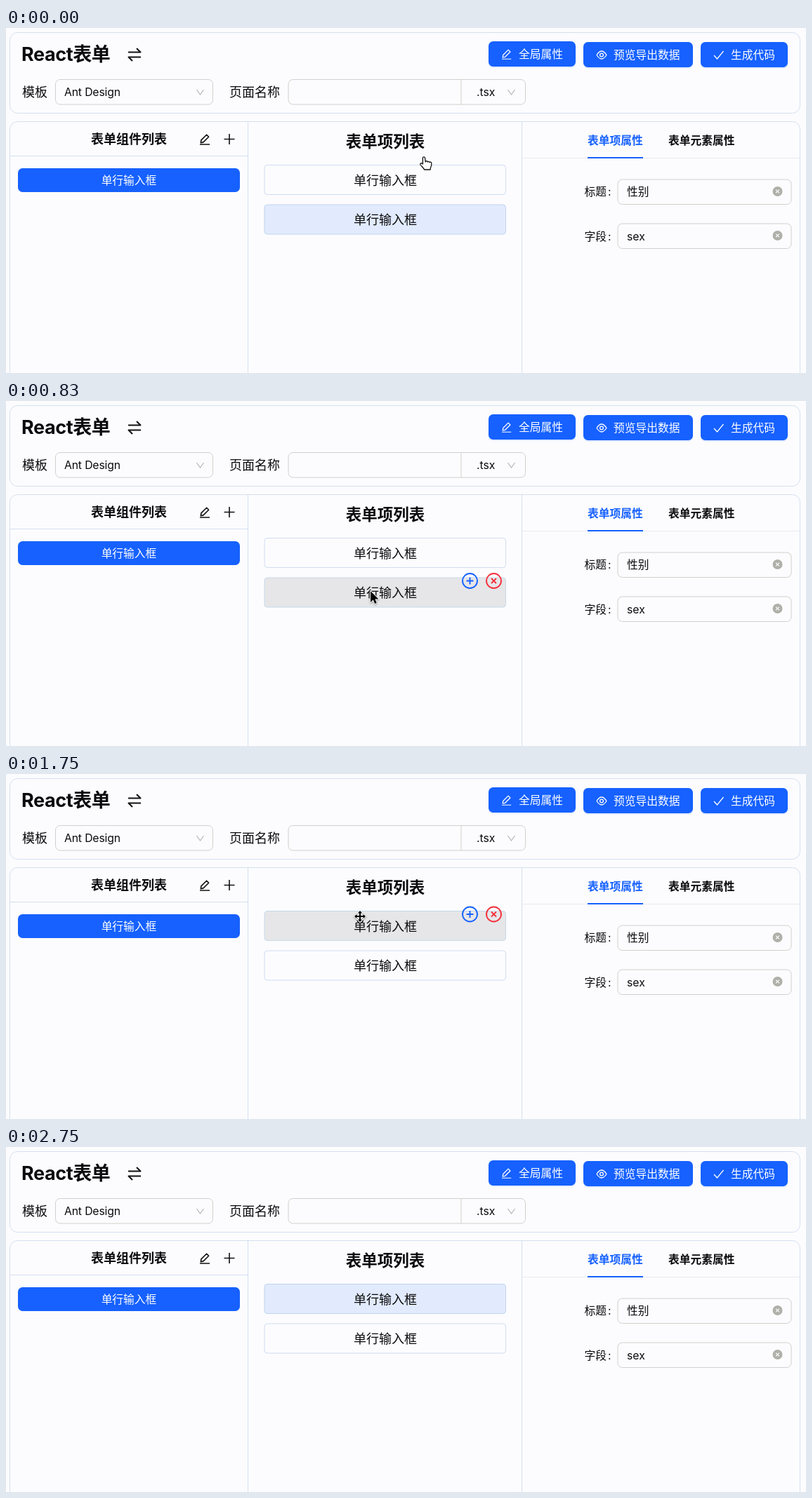
Animation of 1139x492 px, one loop 3.41 s. Source, as an HTML page:

```html
<!DOCTYPE html>
<html lang="zh-CN">
<head>
<meta charset="utf-8">
<title>React表单</title>
<style>
  html, body { margin: 0; height: 100%; overflow: hidden; background: #fcfcfe; }
  svg { display: block; width: 1139px; height: 492px; }
  text { font: 15.75px Inter, "Noto Sans CJK SC", "Noto Sans CJK", sans-serif; fill: #0b0b0d; }
  .mid { text-anchor: middle; }
  text.h18 { font-size: 18px; }
  text.bold { font-weight: 700; }
  text.white { fill: #fff; }
  .panel { fill: none; stroke: #d5dff0; }
  .field { fill: none; stroke: #d0d0cc; }
  .item { fill: none; stroke: #cfdcf0; }
  .selected .item { fill: rgba(22, 100, 255, .11); stroke: #bfd4ee; }
  .hover .item { fill: rgba(0, 0, 0, .085); stroke: #c6d8ea; }
  .tools { visibility: hidden; fill: none; stroke-width: 1.9; }
  .hover .tools { visibility: visible; }
  .icon { fill: none; stroke: #111; stroke-width: 1.6; stroke-linejoin: round; }
  .thin { stroke: #fff; stroke-width: 1.3; }
  .chevron { fill: none; stroke: #b4b4b4; stroke-width: 1.2; }
  .button { fill: #1661ff; filter: drop-shadow(0 2px 0 rgba(5, 100, 255, .1)); }
  .pointer { fill: #000; stroke: #fff; stroke-width: 1.8; paint-order: stroke; stroke-linejoin: round;
    filter: drop-shadow(0 1px 1px rgba(0, 0, 0, .35)); }
</style>
</head>
<body>
<svg viewBox="0 0 1139 492">
  <defs>
    <path id="pencil" d="M10.6 1.2l3 3-7.7 7.7-3.6.7.6-3.7zM1 15h14"/>
    <path id="chevron" d="M-5-3.5L0 3.5 5-3.5"/>
    <g id="clear">
      <circle r="7" fill="#b0b0aa"/>
      <path d="M-2.4-2.4l4.8 4.8m0-4.8l-4.8 4.8" stroke="#fff" stroke-width="1.2"/>
    </g>
    <g id="body">
      <rect class="item" x="368" y=".5" width="343.5" height="42" rx="4"/>
      <text class="mid h18" x="540" y="28.5">单行输入框</text>
      <g class="tools">
        <path stroke="#1661ff" d="M650 5a10.5 10.5 0 0 1 21 0a10.5 10.5 0 0 1-21 0m5.5 0h10m-5-5v10"/>
        <path stroke="#f5303c" d="M684 5a10.5 10.5 0 0 1 21 0a10.5 10.5 0 0 1-21 0m7-3.5l7 7m0-7l-7 7"/>
      </g>
    </g>
    <path id="arrow" class="pointer" d="M0 0v16l3.7-3.5 2.4 5.6 2.7-1.1-2.4-5.5h5.1z"/>
    <path id="move" class="pointer" d="M0-8l3.2 3.4H1v3.6h3.6v-2.2L8 0 4.6 3.2V1H1v3.6h2.2L0 8l-3.2-3.4H-1V1h-3.6v2.2L-8 0l3.4-3.2V-1H-1v-3.6h-2.2z"/>
    <path id="hand" fill="#fff" stroke="#111" stroke-width="1.3" stroke-linejoin="round"
      d="M-1.6 10V1.2C-1.6-.5 1.3-.5 1.5 1.2L2.2 7c.2-1.8 2.9-1.7 3 .2.3-1.3 2.7-1.2 2.8.6.5-1.1 2.7-.8 2.8.8.3 3.2-.2 5-1.4 7l-.3 2.4H.6C-.7 15-3.2 13.500-4.900 11c-1-1.900 1-2.800 2.100-1.800z"/>
  </defs>

  <rect class="panel" x="5.500" y="6.500" width="1125" height="115" rx="11"/>
  <text class="bold" style="font-size:27px;letter-spacing:-.4px" x="22" y="47">React表单</text>
  <path class="icon" style="stroke-width:2" d="M174 34.500h17.500l-5.500-5.500M192 41.500h-17.500l5.500 5.500"/>

  <rect class="button" x="687" y="19" width="124" height="36" rx="6.500"/>
  <rect class="button" x="822" y="20" width="156" height="36" rx="6.500"/>
  <rect class="button" x="989" y="20" width="124" height="36" rx="6.500"/>
  <use href="#pencil" class="icon thin" transform="translate(705 30) scale(.95)"/>
  <path class="icon thin" d="M841 38.500q7-11 14 0q-7 11-14 0m4.600 0a2.400 2.400 0 0 1 4.800 0a2.400 2.400 0 0 1-4.800 0M1008 39l4.500 5 9-11"/>
  <text class="white" x="730" y="43">全局属性</text>
  <text class="white" x="865" y="44">预览导出数据</text>
  <text class="white" x="1032" y="44">生成代码</text>

  <text class="h18" x="23" y="98">模板</text>
  <rect class="field" x="70.500" y="73.500" width="224" height="35.500" rx="6.500"/>
  <text x="83" y="97" letter-spacing="-.15">Ant Design</text>
  <use href="#chevron" class="chevron" x="276.500" y="91.500"/>
  <text class="h18" x="318" y="98">页面名称</text>
  <rect class="field" x="402" y="73.500" width="337.500" height="35.500" rx="6.500"/>
  <path class="field" d="M648 73.500v35.500"/>
  <text x="670" y="97">.tsx</text>
  <use href="#chevron" class="chevron" x="719.500" y="91.500"/>

  <rect class="panel" x="5.500" y="133.500" width="1125" height="400" rx="11"/>
  <path class="panel" d="M344.500 134v358M734.500 134v358M6 182.500h338"/>
  <path stroke="#e6eaf2" d="M735 185.500h395"/>
  <text class="bold mid h18" x="175" y="165">表单组件列表</text>
  <use href="#pencil" class="icon" x="275" y="151"/>
  <path class="icon" d="M310.500 158.500h15m-7.500-7.500v15"/>
  <rect x="17" y="200" width="316" height="34" rx="6.500" fill="#1661ff"/>
  <text class="white mid" x="175" y="223">单行输入框</text>

  <text class="bold mid" style="font-size:22.5px" x="540" y="169.500">表单项列表</text>
  <g id="other"><use href="#body" visibility="hidden"/></g>
  <g id="chosen" class="selected"></g>

  <text class="bold" style="fill:#1661ff" x="828" y="166">表单项属性</text>
  <text class="bold" x="943" y="166">表单元素属性</text>
  <path d="M828 185h79" stroke="#1661ff" stroke-width="2.200"/>
  <text x="823.500" y="239">标题<tspan x="857">:</tspan></text>
  <text x="823.500" y="302.500">字段<tspan x="857">:</tspan></text>
  <rect class="field" x="871" y="216" width="247" height="35.500" rx="6.500"/>
  <rect class="field" x="871" y="279" width="247" height="35.500" rx="6.500"/>
  <text x="884" y="239">性别</text>
  <text x="884" y="302.500">sex</text>
  <use href="#clear" x="1098.500" y="233"/>
  <use href="#clear" x="1098.500" y="296"/>

  <use id="cursor"/>
</svg>
<script>
const LOOP = 3410, TOP = 195, GAP = 56.5;
const $ = id => document.getElementById(id);
const other = $('other'), chosen = $('chosen'), cursor = $('cursor');

for (const row of [other, chosen]) row.replaceChildren(...[...$('body').children].map(n => n.cloneNode(true)));

// start ms, pointer shape, x, y, hovered row, swap progress
const steps = [
  [0, 'hand', 595, 184, '', 0],
  [330, 'arrow', 580, 206, 'other', 0],
  [410, 'arrow', 552, 236, 'other', 0],
  [500, 'arrow', 533, 256, 'chosen', 0],
  [580, 'arrow', 524, 266, 'chosen', 0],
  [660, 'arrow', 521, 269, 'chosen', 0],
  [750, 'arrow', 520, 270, 'chosen', 0],
  [830, 'arrow', 519, 271, 'chosen', 0],
  [1330, 'arrow', 518, 269, 'chosen', 0],
  [1500, 'move', 510, 236, '', 0],
  [1580, 'move', 505, 205, '', .415],
  [1660, 'move', 504, 203, '', .9],
  [1750, 'move', 504, 203, 'chosen', 1],
  [2080, 'arrow', 503, 201, 'gone', 1],
  [2250, 'arrow', 503, 201, 'chosen', 1],
  [2500, 'arrow', 545, 222, 'chosen', 1],
  [2580, 'arrow', 745, 318, '', 1],
  [2660, 'arrow', 1118, 478, '', 1],
  [2750, 'none', 0, 0, '', 1]
];

function draw(now) {
  const t = now % LOOP;
  const [, shape, x, y, hovered, swap] = steps.findLast(step => step[0] <= t);
  other.setAttribute('transform', `translate(0 ${TOP + GAP * swap})`);
  chosen.setAttribute('transform', `translate(0 ${TOP + GAP * (1 - swap)})`);
  other.classList.toggle('hover', hovered === 'other');
  chosen.classList.toggle('hover', hovered === 'chosen');
  chosen.style.display = hovered === 'gone' ? 'none' : '';
  cursor.setAttribute('href', '#' + shape);
  cursor.setAttribute('transform', `translate(${x} ${y})`);
  requestAnimationFrame(draw);
}
draw(0);
</script>
</body>
</html>
```
